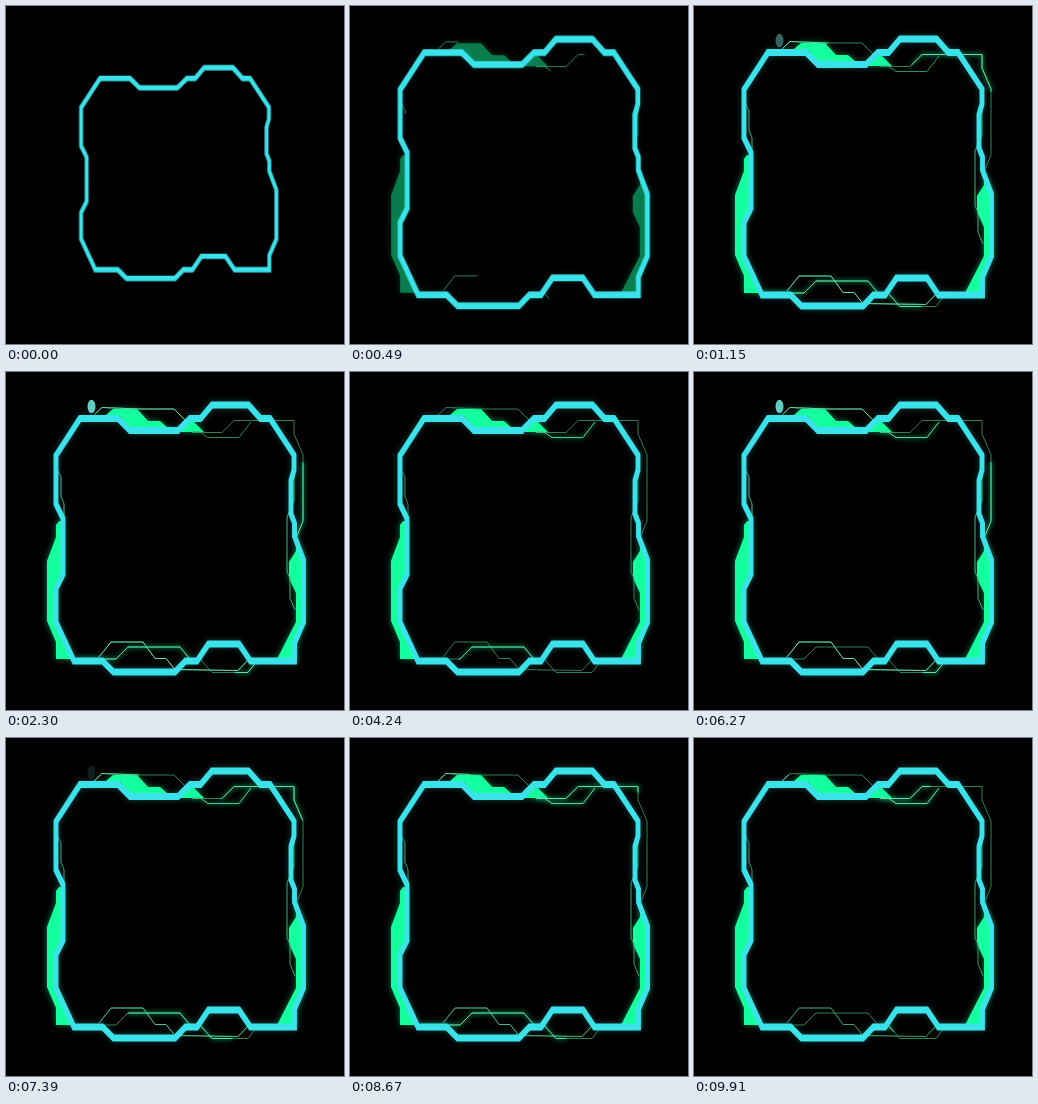
Animation, 338 px wide and 338 px high, one loop 9940 ms. Source, as an HTML page:

```html
<!DOCTYPE html>
<html lang="en">
<head>
<meta charset="utf-8">
<title>Neon frame</title>
<style>
  html, body { margin: 0; width: 100%; height: 100%; overflow: hidden; background: #000; }
  svg { display: block; width: 100vw; height: 100vh; }
  path { fill: none; }
  #fills { filter: drop-shadow(0 0 3px #12ff9e80); }
  #fills path { fill: #14ff9e; }
  #lines path { stroke: #34905f; stroke-width: 0.9; }
  #lights path, #beams path { stroke: #62e6b4; stroke-width: 0.9; }
  #beams { filter: drop-shadow(0 0 2.5px #19ffa0) drop-shadow(0 0 2px #19ffa060); }
  #ring { stroke: #3ae3ea; stroke-width: 6.8; }
  #halo { filter: blur(3px); }
  #dot { fill: #6ee5d8; }
</style>
</head>
<body>
<svg viewBox="0 0 338 338">
  <g id="stage">
    <use id="halo" href="#ring"/>
    <g id="fills">
      <path d="M100 43 107 37H131L142 49H154L162 56 125 57 114 44Z"/>
      <path d="M174 60 186 48 198 60Z"/>
      <path d="M53 149 50 153V165L41 189V249L50 270V287H67L50 250V216L57 203V150Z"/>
      <path d="M290 165V179L283 190V206L290 221V250L271 287H290V271L299 249V188Z"/>
    </g>
    <g id="lines"></g>
    <g id="lights"></g>
    <g id="beams"></g>
    <path id="ring"/>
    <ellipse id="dot" cx="85.5" cy="34.5" rx="4" ry="6.7"/>
  </g>
</svg>
<script>
const LOOP = 9940, PULSE = 1323, SQUEEZE = 0.72;
const $ = id => document.getElementById(id);
const clamp = v => Math.max(0, Math.min(1, v));
const ramp = (t, from, to) => clamp((t - from) / (to - from));
const easeOut = p => 1 - (1 - p) ** 3;
// Triangle wave over the pulse period, 1 at the peak phase.
const triangle = (t, peak) => 1 - 2 * Math.abs((t / PULSE + 1.5 - peak) % 1 - 0.5);

// Squeezed horizontally so that upright strokes come out thinner.
const ring = `74,46.5 112,46.5 124,58.5 172,58.5 184,46.5 194.5,46.5 206,33 242.5,33
  254.5,46.5 264,46.5 288,83 288,98 285,108.5 285,142 288.5,151 288.5,164 297.5,188
  297.5,250 288.5,271 288.5,289 244.5,289 233,272 202.5,272 191,289 179.5,289 169,300
  107.5,300 96.5,289 68,289 50,250 50,216.5 57,202.5 57,146.5 50,132 50,83.5`;
$('ring').setAttribute('d', 'M' + ring.split(/\s+/).map(p => {
  const [x, y] = p.split(',');
  return `${(x / SQUEEZE).toFixed(2)} ${y}`;
}).join('L') + 'Z');
$('ring').setAttribute('transform', `scale(${SQUEEZE} 1)`);

// Each light either fades with its level or slides along its line.
const slide = (el, pos, size) => {
  el.setAttribute('stroke-dasharray', `${size} 4`);
  el.setAttribute('stroke-dashoffset', size / 2 - pos);
};
const fade = (el, s) => { el.style.opacity = clamp(2 * s.pulse - 0.6); };
const dim = (el, s) => { el.style.opacity = 0.4 * s.pulse; };
const flicker = (el, s) => { el.style.opacity = s.flicker; };
const fillUp = (el, s) => slide(el, s.run - 0.4, 1);
const run = (el, s) => slide(el, s.run, 0.5);
const sweep = (el, s) => slide(el, s.sweep, 1);

const wires = [
  ['lights', fillUp, 'M88 43 96 35.5 133 37H168L180 49'],
  ['beams', run, 'M186 60.5H216L228 48.5H288V62L297 83V149L290 166'],
  ['beams', flicker, 'M186 60 194 60 202 65.5H233L245 50'],
  ['lights', fade, 'M93 285 105 270H137L149 286.5H160L169 297.5 232 298.5 243 287'],
  ['beams', sweep, 'M70 287H110L122 275H174L184 287'],
  ['beams', run, 'M184 287H194L206 300.5H242L250 290'],
  ['lights', dim, 'M288 96V129L281 145V200L284 206V226L289 238'],
  ['lights', dim, 'M51 97 55 105V124L58 132V146']
].map(([group, move, d]) => {
  const add = id => {
    const el = document.createElementNS('http://www.w3.org/2000/svg', 'path');
    el.setAttribute('d', d);
    el.setAttribute('pathLength', 1);
    return $(id).appendChild(el);
  };
  return { line: add('lines'), light: add(group), move };
});

function draw(t) {
  const turn = t % 3200;
  const signals = {
    pulse: triangle(t, 0.76),
    run: 2 * triangle(t, 0.73) - 1.05,
    flicker: 0.5 + 0.5 * Math.cos((t - 420) / 1200 * 2 * Math.PI),
    sweep: 1.5 - ramp(turn, 800, 1150) - ramp(turn, 2500, 2900)
  };
  const scale = 0.788 + 0.212 * easeOut(ramp(t, 0, 600));
  $('stage').setAttribute('transform', `translate(169 169) scale(${scale}) translate(-169 -169)`);
  $('fills').style.opacity = ramp(t, 250, 750);
  $('halo').style.opacity = 0.3 * ramp(t, 250, 750);
  $('lights').style.opacity = $('beams').style.opacity = ramp(t, 600, 1000);
  $('dot').style.opacity = ramp(t, 500, 900) * clamp((signals.pulse - 0.6) / 0.4);

  const drawn = ramp(t, 350, 950);
  for (const { line, light, move } of wires) {
    line.setAttribute('stroke-dasharray', `${drawn} 2`);
    line.style.opacity = drawn > 0 ? 1 : 0;
    move(light, signals);
  }
}

function tick() {
  draw(performance.now() % LOOP);
  requestAnimationFrame(tick);
}
draw(0);
tick();
</script>
</body>
</html>
```
